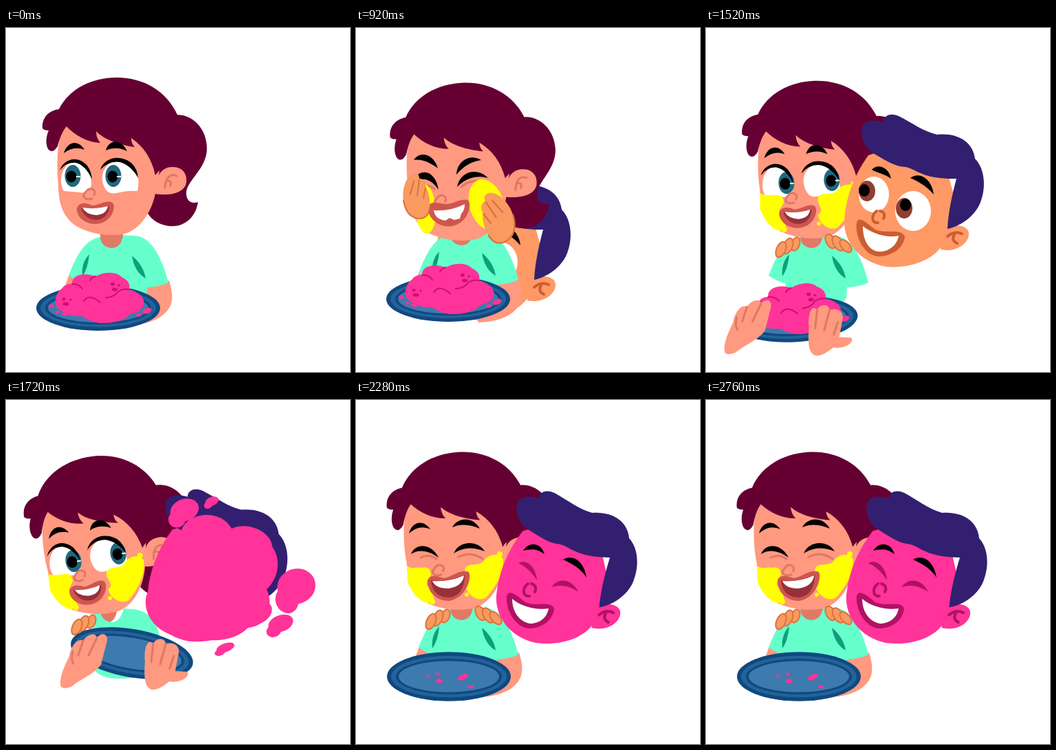
Write an HTML page that moves like this. It is 500 px wide and 500 px high and loops after 2800 ms.

```html
<!DOCTYPE html>
<html lang="en">
<head>
<meta charset="utf-8">
<title>Colour fun</title>
<style>
html, body { margin: 0; width: 100%; height: 100%; overflow: hidden; background: #fff; }
svg { display: block; width: 100vw; height: 100vh; }
.skin { fill: #ff9980; }
.hair { fill: #660033; }
.tee { fill: #66ffcc; }
.lip { fill: #cf564e; }
.gum { fill: #98303a; }
.white { fill: #fff; }
.yellow { fill: #ffff00; }
.pink { fill: #ff3399; }
.line { fill: none; stroke: #de7766; stroke-width: 3; stroke-linecap: round; }
.hand { fill: #f99a60; stroke: #d9733f; stroke-width: 2; stroke-linecap: round; stroke-linejoin: round; }
.dark { fill: none; stroke: #c90f76; stroke-width: 2; stroke-linecap: round; }
.spot { fill: #c90f76; }
#boy { --skin: #ff9966; --shade: #cc5c33; }
#boy.painted { --skin: #ff3399; --shade: #b01263; }
.bskin { fill: var(--skin); }
.bshade { fill: var(--shade); }
.bline { fill: none; stroke: var(--shade); stroke-width: 4; stroke-linecap: round; }
</style>
</head>
<body>
<svg viewBox="0 0 500 500" xmlns="http://www.w3.org/2000/svg">
<g id="backSlot">
  <g id="boy">
    <path class="bskin" d="M236 185C222 205 204 235 201 280C200 310 222 340 262 347C300 350 335 335 345 312L362 250L350 205L280 170Z"/>
    <path class="bskin" d="M341 295C350 283 382 284 382 299C382 314 362 327 341 322Z"/>
    <path class="bline" d="M351 303Q361 294 372 299M361 300Q356 309 365 313"/>
    <path fill="#331f70" d="M226 150C225 138 238 131 258 137C258 127 268 123 280 128C300 138 315 150 336 155C365 152 388 165 391 190C405 204 407 230 400 250C395 268 375 287 351 292C352 270 357 245 364 219C350 219 330 219 312 211C304 208 297 203 290 202C276 202 262 193 243 182C232 174 226 164 226 150Z"/>
    <g id="boyOpen">
      <ellipse class="white" cx="244" cy="242" rx="22" ry="26"/>
      <ellipse class="white" cx="301" cy="266" rx="26" ry="29"/>
      <ellipse fill="#8f3f30" cx="234" cy="237" rx="12" ry="15"/>
      <ellipse fill="#8f3f30" cx="288" cy="262" rx="12" ry="15"/>
      <ellipse cx="230" cy="236" rx="8" ry="9"/>
      <ellipse cx="290" cy="257" rx="8" ry="9"/>
      <path d="M241 206C250 196 266 203 269 219C260 212 250 211 241 206Z"/>
      <path d="M297 218C312 207 329 222 331 242C321 230 309 223 297 218Z"/>
      <path class="bskin" d="M250 264Q242 270 243 284H257Q263 270 250 264Z"/>
      <path class="bline" d="M248 266C240 272 240 284 250 283M253 266Q262 268 258 277"/>
      <path class="bshade" d="M219 283C222 272 234 284 246 293C262 300 282 290 289 303C287 322 268 332 250 332C228 330 216 300 219 283Z"/>
      <path class="white" d="M228 288C240 298 262 306 280 302C277 319 262 326 250 325C234 322 228 305 228 288Z"/>
    </g>
    <g id="boyLaugh" transform="rotate(-2 280 250) translate(-4 -7)">
      <path d="M243 219C252 205 269 207 274 224C264 216 254 216 243 219Z"/>
      <path d="M301 232C316 223 332 236 335 258C326 244 314 238 301 232Z"/>
      <path class="bshade" d="M236 237C249 230 262 244 263 262C254 248 246 242 236 237Z"/>
      <path class="bshade" d="M284 272C295 257 314 260 323 279C310 270 298 268 284 272Z"/>
      <path class="bline" d="M250 267C241 274 242 286 252 285M255 267Q264 270 260 279"/>
      <path class="bshade" d="M219 285C222 274 234 284 246 294C262 301 282 291 288 303C286 322 268 332 252 332C230 331 217 302 219 285Z"/>
      <path class="white" d="M227 289C240 300 262 306 280 303C277 319 264 325 253 325C236 322 227 306 227 289Z"/>
    </g>
  </g>
</g>
<g id="tail">
  <path class="hair" d="M240 128C262 120 292 140 292 175C292 205 262 222 262 240C262 252 270 256 279 253C276 275 260 288 242 288C225 288 212 280 205 268L215 200Z"/>
</g>
<g id="body">
  <g id="arms" class="skin">
    <path d="M92 358L84 380L112 388L116 368Z"/>
    <path d="M203 374L237 367C244 390 244 405 227 418C215 427 200 431 178 432L168 415L205 400Z"/>
  </g>
  <path fill="#e07a66" d="M137 290V308Q140 323 153 323Q168 321 170 305V290Z"/>
  <g id="sleeves">
    <path class="tee" d="M137 304C117 308 106 322 91 360Q105 369 115 371L122 392Q126 405 160 405Q200 405 204 392L205 377Q225 376 236 370C228 338 213 304 188 302L170 301Q168 319 153 320Q138 318 137 304Z"/>
    <path fill="#0e9f78" d="M121 329Q109 341 111 361Q119 350 121 329ZM183 331Q187 355 203 364Q200 345 183 331Z"/>
  </g>
  <path id="torso" class="tee" d="M146 305Q138 307 136 312L134 385Q142 403 175 403Q212 403 218 385L232 345C232 325 218 303 192 302L180 301Q176 320 162 321Q148 319 146 305Z"/>
</g>
<g id="head">
  <path class="skin" d="M84 135C74 165 73 200 76 227C76 257 84 277 104 289C125 300 150 303 170 300C195 294 214 265 218 235L232 160L150 100Z"/>
  <path class="hair" d="M53 146C52 130 62 120 77 118C92 88 125 72 161 72C200 72 234 92 249 126C250 165 245 190 232 204Q222 206 217 214C212 190 200 172 182 160Q182 168 187 173C165 170 142 162 131 150Q131 160 137 167C118 166 100 156 88 143C82 150 78 160 75 172Q68 183 62 177C57 170 58 158 62 149Q56 149 53 146Z"/>
  <g transform="translate(2 0)">
    <path class="skin" d="M214 241C215 215 224 202 240 202C256 202 262 214 260 225C258 238 240 245 214 241Z"/>
    <path class="line" d="M229 232C230 216 238 211 246 215M231 222Q240 221 237 229"/>
  </g>
  <g id="open">
    <path class="white" d="M84 237C75 222 82 194 102 194C120 194 127 222 123 232Q118 241 108 239Z"/>
    <path class="white" d="M146 236C134 220 140 195 163 193C186 191 197 214 191 237Q176 236 165 239Q152 243 146 236Z"/>
    <g id="irisL">
      <ellipse fill="#20687f" cx="97" cy="215" rx="11.5" ry="16"/>
      <ellipse cx="95" cy="216" rx="7.5" ry="8.5"/><rect class="white" x="102" y="215" width="6" height="2"/>
    </g>
    <g id="irisR">
      <ellipse fill="#20687f" cx="156" cy="215" rx="11.5" ry="16"/>
      <ellipse cx="155" cy="216" rx="7.5" ry="8.5"/><rect class="white" x="161" y="215" width="6" height="2"/>
    </g>
    <path d="M78 207C84 190 104 184 118 200Q124 208 125 220Q116 200 102 196Q88 194 78 207Z"/>
    <path d="M137 206C144 187 166 184 182 196Q191 204 192 218Q182 200 166 195Q150 192 137 206Z"/>
    <path d="M84 182C90 163 106 163 114 177C104 173 94 174 84 182ZM145 178C150 161 168 161 176 179C166 174 156 173 145 178Z"/>
  </g>
  <g id="squint" transform="rotate(3 150 250) translate(-2 -8)">
    <path d="M84 192C93 178 113 183 119 204C108 196 96 190 84 192ZM146 213C147 193 166 182 182 192C168 194 156 201 146 213Z"/>
    <path d="M82 226C88 203 115 203 120 235C109 219 96 215 82 226ZM147 231C152 206 178 203 192 218C174 213 159 219 147 231Z"/>
    <path class="line" d="M90 234Q102 224 114 234M153 231Q166 220 184 223"/>
  </g>
  <g id="laugh" transform="rotate(4 150 250) translate(1 -3)">
    <path d="M77 193C82 174 99 173 108 187C97 182 87 184 77 193ZM140 184C148 169 170 168 180 186C167 180 153 178 140 184Z"/>
    <path d="M80 223C86 206 110 207 120 228C106 218 92 215 80 223ZM142 222C150 202 178 203 187 219C171 212 155 213 142 222Z"/>
    <path class="line" d="M94 228Q106 222 117 230M149 227Q168 218 184 230"/>
  </g>
  <g id="smear" class="yellow" transform="rotate(3 150 250) translate(-2 -8)">
    <g id="smearL"><ellipse cx="101" cy="263" rx="15" ry="36" transform="rotate(-4 101 263)"/></g>
    <g id="smearR"><ellipse cx="190" cy="257" rx="25" ry="38" transform="rotate(-18 190 257)"/></g>
  </g>
  <g id="paint" class="yellow" transform="rotate(4 150 250) translate(0 -2)">
    <path d="M75 239C82 245 90 240 96 242C103 240 109 243 109 248C113 255 103 259 104 267C110 275 118 285 112 291C100 299 82 280 76 262Z"/>
    <circle cx="112" cy="291" r="4"/>
    <path d="M160 242C166 234 178 240 186 233C192 222 210 218 215 230C216 250 204 270 190 285C180 292 164 284 160 268C172 262 156 252 160 242Z"/>
    <circle cx="210" cy="222" r="4"/><circle cx="162" cy="281" r="3"/>
  </g>
  <path class="line" d="M117 237C122 230 133 236 128 243M116 238C109 245 115 251 125 248"/>
  <g id="smile">
    <path class="lip" d="M103 262C106 252 118 254 125 258C135 258 146 249 155 254C161 262 152 284 131 285C112 285 102 272 103 262Z"/>
    <path class="gum" d="M109 261Q130 264 150 259C150 270 142 279 130 279C118 278 111 270 109 261Z"/>
    <path class="white" d="M111 261Q130 264 148 259Q146 271 131 272Q116 271 111 261Z"/>
  </g>
  <g id="grin" transform="rotate(3 150 250) translate(-2 -8)">
    <path class="lip" d="M105 262C107 250 118 254 130 256C142 256 152 247 163 250C169 257 163 283 140 288C118 291 104 274 105 262Z"/>
    <path class="white" d="M113 265Q136 267 158 256C158 263 156 267 153 270L151 277L143 279L136 276L130 280Q115 278 113 265Z"/>
  </g>
  <g id="bigLaugh" transform="rotate(4 150 250) translate(1 -3)">
    <path class="lip" d="M104 262C106 251 120 256 128 258C140 256 152 244 164 249C169 260 158 288 135 291C114 291 104 275 104 262Z"/>
    <path class="gum" d="M109 261Q135 264 158 253C158 275 148 285 135 286C118 286 110 275 109 261Z"/>
    <path class="white" d="M111 262Q135 264 157 254Q155 270 134 273Q116 273 111 262Z"/>
  </g>
</g>
<g id="frontSlot"></g>
<g id="fingers" class="hand">
  <g>
    <ellipse cx="130" cy="314" rx="6" ry="10" transform="rotate(20 130 314)"/>
    <ellipse cx="119" cy="317" rx="6.5" ry="12" transform="rotate(22 119 317)"/>
    <ellipse cx="109" cy="322" rx="6.5" ry="12" transform="rotate(24 109 322)"/>
  </g>
  <g id="fingersR">
    <ellipse cx="181" cy="310" rx="6.5" ry="11" transform="rotate(-28 181 310)"/>
    <ellipse cx="192" cy="313" rx="6.5" ry="12" transform="rotate(-32 192 313)"/>
    <ellipse cx="203" cy="317" rx="6" ry="11" transform="rotate(-42 203 317)"/>
  </g>
</g>
<defs>
  <g id="palm" class="hand">
    <path stroke="none" d="M-19 5C-22 -12 -14 -32 -4 -34C2 -35 4 -31 4 -27C11 -26 14 -20 13 -14C18 -8 20 5 19 15C18 30 8 33 0 31C-12 28 -17 18 -19 5Z"/>
    <path fill="none" d="M-19 5C-17 18 -12 28 0 31C8 33 18 30 19 15M-9 -4L-4 -23M1 -2L4 -25M10 2L13 -13"/>
  </g>
</defs>
<use id="palmL" href="#palm"/>
<use id="palmR" href="#palm"/>
<g id="plate">
  <ellipse fill="#10497f" rx="90" ry="33"/>
  <ellipse fill="#22639a" rx="84" ry="28"/>
  <ellipse fill="#10497f" rx="77" ry="24"/>
  <ellipse fill="#3d7aae" rx="73" ry="21"/>
  <g id="crumbs" class="pink">
    <path d="M-20 -4l4 -2 4 4 -5 0ZM-34 -3l6 2 2 3 -6 -2Z"/>
    <ellipse cx="-14" cy="6" rx="5" ry="3"/>
    <path d="M12 4Q15 -4 27 -4Q30 0 24 2Q20 7 12 4Z"/>
    <ellipse cx="32" cy="14" rx="4" ry="2"/>
  </g>
  <g id="powder" transform="translate(-134 -407)">
    <g class="pink">
      <path d="M72 400C71 390 76 382 82 378C84 374 92 371 96 372C95 360 112 354 130 361C144 354 160 354 168 362C178 366 181 374 179 380C194 384 203 393 200 403C197 413 185 414 180 416C172 426 155 429 140 429C126 429 116 422 110 419C92 420 73 411 72 400Z"/>
      <ellipse cx="66" cy="404" rx="4" ry="2.5"/><ellipse cx="75" cy="413" rx="3" ry="2"/>
      <ellipse cx="85" cy="416" rx="5" ry="2.5"/><ellipse cx="193" cy="417" rx="4" ry="2.5"/>
      <ellipse cx="205" cy="411" rx="7" ry="4" transform="rotate(-20 205 411)"/>
    </g>
    <path class="dark" d="M96 372Q107 372 111 379M130 361Q125 362 122 367M113 397Q121 385 137 399M145 392Q158 391 163 383M163 383Q171 378 179 380"/>
    <g class="spot">
      <ellipse cx="155" cy="372" rx="3" ry="2.5"/><ellipse cx="164" cy="374" rx="2" ry="1.5"/>
      <ellipse cx="158" cy="380" rx="4" ry="2.5"/><ellipse cx="87" cy="401" rx="4.5" ry="2.5"/>
      <ellipse cx="84" cy="394" rx="2.5" ry="2"/><ellipse cx="94" cy="395" rx="1.5" ry="1.5"/>
    </g>
  </g>
</g>
<g id="grip">
  <path class="skin" d="M80 417C76 405 86 385 92 372C94 358 104 345 112 350C118 340 130 337 132 345C142 335 150 342 146 354L138 385C128 398 108 406 96 416C90 419 84 420 80 417Z"/>
  <path class="skin" d="M202 380C200 360 206 346 214 354C220 344 232 346 232 355C244 350 253 358 251 368L246 394L264 395C268 404 250 412 238 409C230 414 222 422 212 421C202 418 200 405 202 380Z"/>
  <path class="line" d="M112 350L105 371M132 346L120 371M97 365Q94 378 98 383M214 354L211 381M232 355L224 384M244 372L238 390"/>
</g>
<g id="cloud" class="pink">
  <path d="M203 290C205 270 225 265 229 240C222 215 235 195 255 190C262 163 312 157 328 187C350 176 385 190 387 213C400 232 397 258 379 275C390 300 380 329 352 331C330 353 290 353 273 342C240 353 200 325 203 290Z"/>
  <g id="bits"></g>
</g>
</svg>
<script>
const $ = id => document.getElementById(id);
const LOOP = 2800, STEP = 40;

const clamp = v => Math.max(0, Math.min(1, v));
const ramp = (t, a, b) => { const k = clamp((t - a) / (b - a)); return k * k * (3 - 2 * k); };
const mix = (a, b, k) => a + (b - a) * k;
const show = (id, on) => { $(id).style.display = on ? '' : 'none'; };
const put = (id, value) => $(id).setAttribute('transform', value);

// Keys are [time, ...values]; values ease from key to key.
function track(t, keys) {
  let i = 0;
  while (i < keys.length - 2 && t >= keys[i + 1][0]) i++;
  const a = keys[i], b = keys[i + 1], k = ramp(t, a[0], b[0]);
  return a.slice(1).map((v, n) => mix(v, b[n + 1], k));
}

const headKeys = [[120, 0, 0, 0], [240, 1, 9, -3], [360, 1, 8, -3], [1000, 2, 8, -3],
  [1120, 0, -1, -4.5], [1200, 0, 1, -4], [1400, 0, 1, -4], [1520, 3, 5, -2],
  [1720, -13, 10, -8], [1780, -18, 11, -9], [1920, -1, 4, -4]];
const plateKeys = [[120, 134, 407, 0, 1], [240, 134, 394, 0, 1], [1000, 134, 394, 0, 1],
  [1160, 134, 407, 0, 1], [1400, 134, 407, 0, 1], [1510, 130, 424, -4, 1], [1670, 185, 364, 11, 1.06],
  [1720, 183, 368, 10, 1.06], [1780, 183, 370, 9, 1.06], [1920, 135, 402, 0, 1.08]];
const boyKeys = [[760, -130, 80, 0, 0.6], [920, -92, 74, 0, 1], [1080, 0, 2, -2, 1],
  [1140, 3, -3, 1, 1], [1200, 0, 0, 0, 1], [1620, 0, 0, 0, 1], [1720, 5, 4, 0.5, 1], [2000, 4, 7, 2, 1]];
const cloudKeys = [[1580, 190, 350, 0.15], [1720, 300, 260, 1], [1800, 302, 260, 1.05],
  [1920, 300, 260, 1], [2000, 300, 260, 1], [2160, 300, 285, 0]];

const bits = [[257, 164, 25, 20], [298, 149, 12, 8], [419, 277, 33, 32], [397, 328, 22, 15], [317, 362, 16, 8]];
$('bits').innerHTML = bits.map(([x, y, w, h]) =>
  `<g transform="translate(${x} ${y}) rotate(-20)"><ellipse cx="${w * 0.15}" cy="${-h * 0.15}" rx="${w * 0.85}" ry="${h * 0.8}"/>` +
  `<ellipse cx="${-w * 0.45}" cy="${h * 0.3}" rx="${w * 0.5}" ry="${h * 0.6}"/></g>`).join('');

function grow(id, x, y, k) {
  show(id, k > 0);
  put(id, `translate(${x} ${y}) scale(${k}) translate(${-x} ${-y})`);
}

function drawGirl(t, bob) {
  let [x, y, r] = track(t, headKeys);
  y -= 4 * bob;
  const pose = `translate(${x} ${y}) rotate(${r} 150 250)`;
  put('head', pose);
  put('tail', pose);

  const shut = t >= 200 && t < 1080, merry = t >= 2000, open = !shut && !merry;
  show('open', open);
  show('smile', open);
  show('squint', shut);
  show('grin', shut);
  show('laugh', merry);
  show('bigLaugh', merry);
  const look = ramp(t, 1000, 1080);
  put('irisL', `translate(${18 * look} ${4 * look})`);
  put('irisR', `translate(${25 * look} ${2 * look})`);
  show('smear', t < 1040);
  show('paint', t >= 1040);
  const spread = ramp(t, 400, 640);
  grow('smearL', 101, 263, spread);
  grow('smearR', 190, 257, spread);
}

function drawPlate(t, bob) {
  const [x, y, r, s] = track(t, plateKeys), py = y + 3 * bob;
  put('plate', `translate(${x} ${py}) rotate(${r}) scale(1 ${s})`);
  const lift = t < 1200 ? (y - 407) * 0.3 : 0;
  const lean = ramp(t, 1560, 1720) - ramp(t, 1780, 1920);
  put('body', `translate(${-9 * lean} ${lift + 2 * lean})`);
  const held = t >= 1440 && t < 1920, raised = t >= 1600 && t < 1880;
  show('grip', held);
  show('arms', !held);
  show('sleeves', !raised);
  show('torso', raised);
  put('grip', `translate(${x - 183} ${py - 368})`);
  show('powder', t < 1600);
  show('crumbs', t >= 1880);
}

function drawHands(t) {
  const reach = ramp(t, 150, 290) * (1 - ramp(t, 960, 1070));
  const rub = Math.cos(2 * Math.PI * (t - 360) / 373.33);
  const size = mix(0.4, 1, reach), on = t >= 160 && t < 1060;
  show('palmL', on);
  show('palmR', on);
  put('palmL', `translate(${mix(118, 88, reach)} ${mix(320, 259.5 + 14 * rub, reach)}) scale(${size})`);
  put('palmR', `translate(${mix(192, 200 - 5.5 * rub, reach)} ${mix(315, 263 - 13.5 * rub, reach)}) rotate(-26) scale(${-1.18 * size} ${1.13 * size})`);
  show('fingers', t >= 1060);
  show('fingersR', t < 1640 || t >= 1880);
  const slip = ramp(t, 1560, 1720) - ramp(t, 1780, 1920);
  put('fingers', `translate(${-6 * slip} ${8 * slip})`);
}

function drawBoy(t, bob) {
  const [x, y, r, s] = track(t, boyKeys);
  $(t < 980 ? 'backSlot' : 'frontSlot').append($('boy'));
  show('boy', t >= 760);
  put('boy', `translate(${x + 280 + bob} ${y + 250 - 3 * bob}) rotate(${r}) scale(${s}) translate(-280 -250)`);
  const painted = t >= 1720;
  $('boy').classList.toggle('painted', painted);
  show('boyOpen', !painted);
  show('boyLaugh', painted);
}

function drawCloud(t) {
  const [x, y, s] = track(t, cloudKeys);
  show('cloud', t >= 1600 && t < 2160);
  put('cloud', `translate(${x} ${y}) scale(${s}) translate(-300 -260)`);
  const burst = 1 + 0.1 * (ramp(t, 1720, 1800) - ramp(t, 1800, 1920));
  put('bits', `translate(300 260) scale(${burst}) translate(-300 -260)`);
}

function draw(t) {
  const bob = t >= 2040 ? (1 - Math.cos(2 * Math.PI * (t - 2040) / 240)) / 2 : 0;
  drawGirl(t, bob);
  drawPlate(t, bob);
  drawHands(t);
  drawBoy(t, bob);
  drawCloud(t);
}

const start = performance.now();
function tick() {
  const t = performance.now() - start;
  draw(Math.floor(t / STEP + 0.01) * STEP % LOOP);
  requestAnimationFrame(tick);
}
tick();
</script>
</body>
</html>
```
